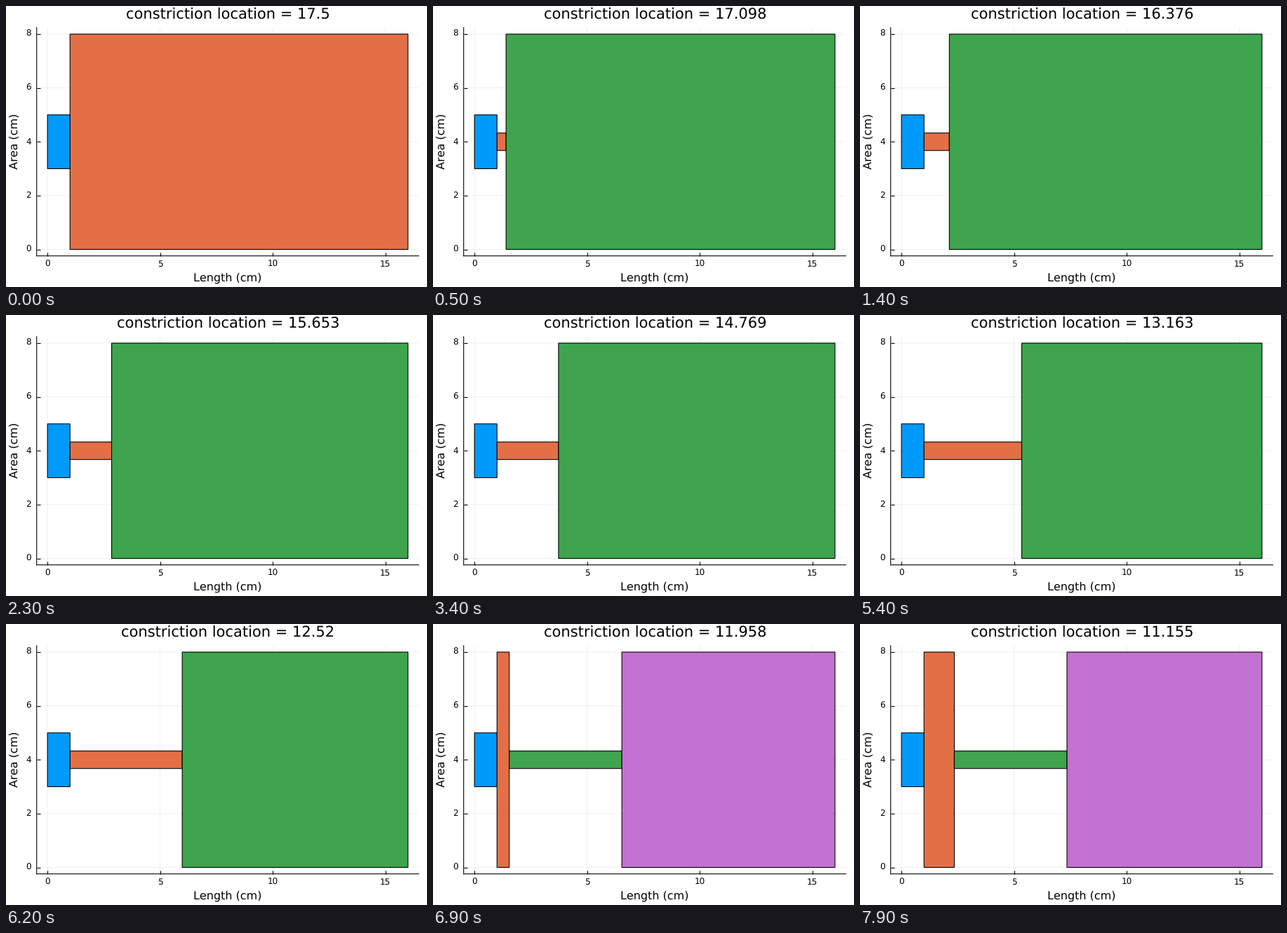
A matplotlib script that plays this animation: 600 by 400 pixels, repeating every 8 s.

```python
import matplotlib.pyplot as plt
from matplotlib.animation import FuncAnimation
from matplotlib.patches import Rectangle

W, H, DPI = 600, 400, 100
FRAMES, INTERVAL = 80, 100

START, STEP = 17.5, 20 / 249    # constriction location and its shift per frame
TUBE_END, LIPS_END = 16, 1      # cm
MAX_LEN = 5                     # longest constriction, cm
MID, LIPS, NARROW, WIDE = 4, 2, 0.65, 8
COLORS = ["#009afa", "#e36f47", "#3ea44e", "#c371d2"]

LEFT, RIGHT, TOP, BOTTOM = 43.7, 588.3, 30.8, 355.7
TITLE, GUIDE, TICK = 20.72, 16.3, 11.85     # font sizes in px

plt.rcParams.update({"font.family": "DejaVu Sans", "text.hinting": "none",
                     "text.hinting_factor": 1})


def pt(px):
    return px * 72 / DPI


fig = plt.figure(figsize=(W / DPI, H / DPI), dpi=DPI, facecolor="white")
ax = fig.add_axes([LEFT / W, 1 - BOTTOM / H, (RIGHT - LEFT) / W, (BOTTOM - TOP) / H])
ax.set_xlim(-0.48, 16.48)
ax.set_ylim(-0.24, 8.24)
ax.set_xticks(range(0, 16, 5))
ax.set_yticks(range(0, 9, 2))
ax.set_axisbelow(True)
ax.grid(color="black", alpha=0.1, linewidth=pt(0.6))
ax.spines[["top", "right"]].set_visible(False)
ax.tick_params(direction="in", length=pt(5), width=pt(1.1), labelsize=pt(TICK))
ax.tick_params(axis="x", pad=pt(6.5))
ax.tick_params(axis="y", pad=pt(7.5))
for side in ("left", "bottom"):
    ax.spines[side].set(linewidth=pt(1.1), snap=False)
for axis in (ax.xaxis, ax.yaxis):
    for tick in axis.get_major_ticks():
        tick.gridline.set_snap(False)
        tick.tick1line.set_snap(False)
for text in ax.get_yticklabels():
    text.set_va("center")


def label(x, y, text, size, **kw):
    """Centred text with its baseline at a pixel position, y downwards."""
    return fig.text(x / W, 1 - y / H, text, fontsize=pt(size), ha="center",
                    va="baseline", rotation_mode="anchor", **kw)


title = label(316.3, 19, "", TITLE)
label(316, 392, "Length (cm)", GUIDE)
label(17, 192.2, "Area (cm)", GUIDE, rotation=90)

bars = [ax.add_patch(Rectangle((0, 0), 0, 0, facecolor=c, edgecolor="black",
                               linewidth=pt(1.1), snap=False, zorder=2))
        for c in COLORS]


def sections(shift):
    """Tube sections from the lips inwards as (length, area)."""
    front = max(0, shift - MAX_LEN)
    narrow = min(shift, MAX_LEN)
    back = TUBE_END - LIPS_END - front - narrow
    parts = [(LIPS_END, LIPS), (front, WIDE), (narrow, NARROW), (back, WIDE)]
    return [p for p in parts if p[0] > 0]


def update(i):
    shift = i * STEP
    title.set_text(f"constriction location = {round(START - shift, 3)}")
    parts = sections(shift)
    x = 0
    for k, bar in enumerate(bars):
        bar.set_visible(k < len(parts))
        if k < len(parts):
            length, area = parts[k]
            bar.set_bounds(x, MID - area / 2, length, area)
            x += length
    return [title, *bars]


anim = FuncAnimation(fig, update, frames=FRAMES, interval=INTERVAL,
                     repeat=True, repeat_delay=0, blit=False)
plt.show()
```
